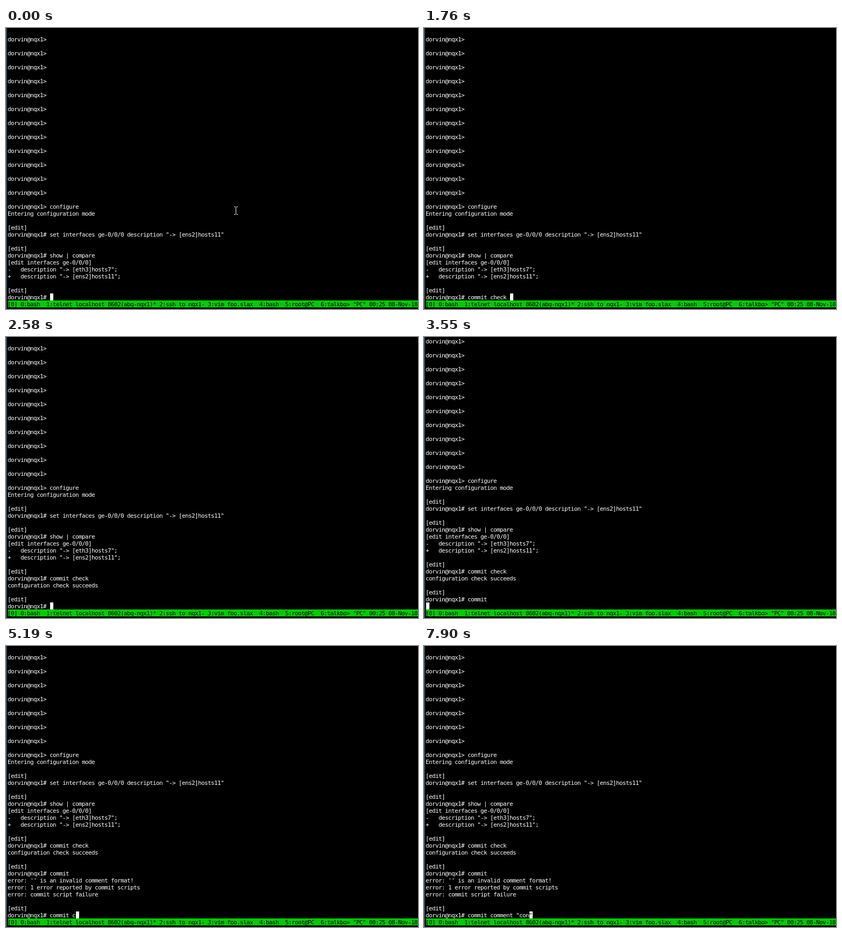
Recreate the animation shown at these times as an HTML page. Size 766x524 px, loop 8000 ms.

```html
<!DOCTYPE html>
<html lang="en">
<head>
<meta charset="utf-8">
<title>Terminal session</title>
<style>
  html, body { margin: 0; width: 100%; height: 100%; overflow: hidden; background: #000; }
  #stage { position: relative; width: 766px; height: 524px; overflow: hidden; background: #000; }
  #stage > * { position: absolute; }
  pre {
    margin: 0;
    font: 11px/13px "DejaVu Sans Mono", monospace;
    letter-spacing: calc(6px - 1ch);
    font-variant-ligatures: none;
    color: #fff;
  }
  #edge { left: 0; top: 0; width: 2px; height: 524px; background: #2e4a54; }
  #screen { left: 3px; top: 2px; }
  #cursor, #status { height: 13px; line-height: 15px; color: #000; overflow: hidden; text-indent: -1px; }
  #cursor { top: 495px; width: 6px; background: #fff; }
  #status { left: 4px; top: 508px; width: 762px; background: #00cd00; }
  #pointer { left: 423px; top: 333px; }
</style>
</head>
<body>
<div id="stage">
  <div id="edge"></div>
  <pre id="screen"></pre>
  <pre id="cursor"></pre>
  <pre id="status"></pre>
  <svg id="pointer" width="9" height="15" fill="none" stroke="#fff">
    <path d="M1 .5h2.5l1 1 1-1h2.5M4.5 1.5v12M1 14.5h2.5l1-1 1 1h2.5"/>
  </svg>
</div>
<script>
const LOOP = 8000, ROWS = 39, LEFT = 4, CELL = 6, POINTER_HIDES = 650;
const el = id => document.getElementById(id);
const device = 'nqx1';
const user = 'dorvin@' + device;
const prompt = user + '# ';

const history = [
  '',
  ...Array.from({ length: 12 }, () => [user + '>', '']).flat(),
  user + '> configure',
  'Entering configuration mode',
  '',
  '[edit]',
  prompt + 'set interfaces ge-0/0/0 description "-> [ens2]hosts11"',
  '',
  '[edit]',
  prompt + 'show | compare',
  '[edit interfaces ge-0/0/0]',
  '-   description "-> [eth3]hosts7";',
  '+   description "-> [ens2]hosts11";',
  '',
  '[edit]'
];
const screens = [];

function show(at, line, back = 0) {
  const col = line.length - back;
  const text = [...history, line].slice(-ROWS).join('\n');
  screens.push({ at, text, col, under: line[col] || ' ' });
}

// Each key: [time, input line, cursor steps back from its end]
function type(keys) {
  for (const [at, input, back] of keys) show(at, prompt + input, back);
}

function enter(at, command, doneAt, output) {
  history.push(prompt + command);
  show(at, '');
  history.push(...output, '', '[edit]');
  show(doneAt, prompt);
}

type([
  [0, ''], [710, 'c'], [770, 'co'], [950, 'com'], [1070, 'comm'], [1150, 'commit '],
  [1380, 'commit c'], [1480, 'commit ch'], [1580, 'commit che'], [1760, 'commit check ']
]);
enter(2010, 'commit check', 2580, ['configuration check succeeds']);
type([[3050, 'commit check '], [3250, 'commit ']]);
enter(3550, 'commit', 3590, [
  "error: '' is an invalid comment format!",
  'error: 1 error reported by commit scripts',
  'error: commit script failure'
]);
type([
  [4410, 'commit '], [5190, 'commit c'], [5310, 'commit co'],
  [5500, 'commit com'], [5620, 'commit comm'], [5730, 'commit comment '],
  [6180, 'commit comment "'], [6360, 'commit comment ""'], [6580, 'commit comment ""', 1],
  [7600, 'commit comment "c"', 1], [7720, 'commit comment "co"', 1], [7900, 'commit comment "con"', 1]
]);

el('status').textContent =
  `[0] 0:bash  1:telnet localhost 8602(abq-${device})* 2:ssh to ${device}- ` +
  '3:vim foo.slax  4:bash  5:root@PC  6:talkbo> "PC" 00:25 08-Nov-18';

let current;
function draw() {
  const t = performance.now() % LOOP;
  const next = screens.findLast(s => s.at <= t);
  if (next !== current) {
    current = next;
    el('screen').textContent = next.text;
    el('cursor').textContent = next.under;
    el('cursor').style.left = LEFT + CELL * next.col + 'px';
  }
  el('pointer').style.visibility = t < POINTER_HIDES ? 'visible' : 'hidden';
  requestAnimationFrame(draw);
}
draw();
</script>
</body>
</html>
```
